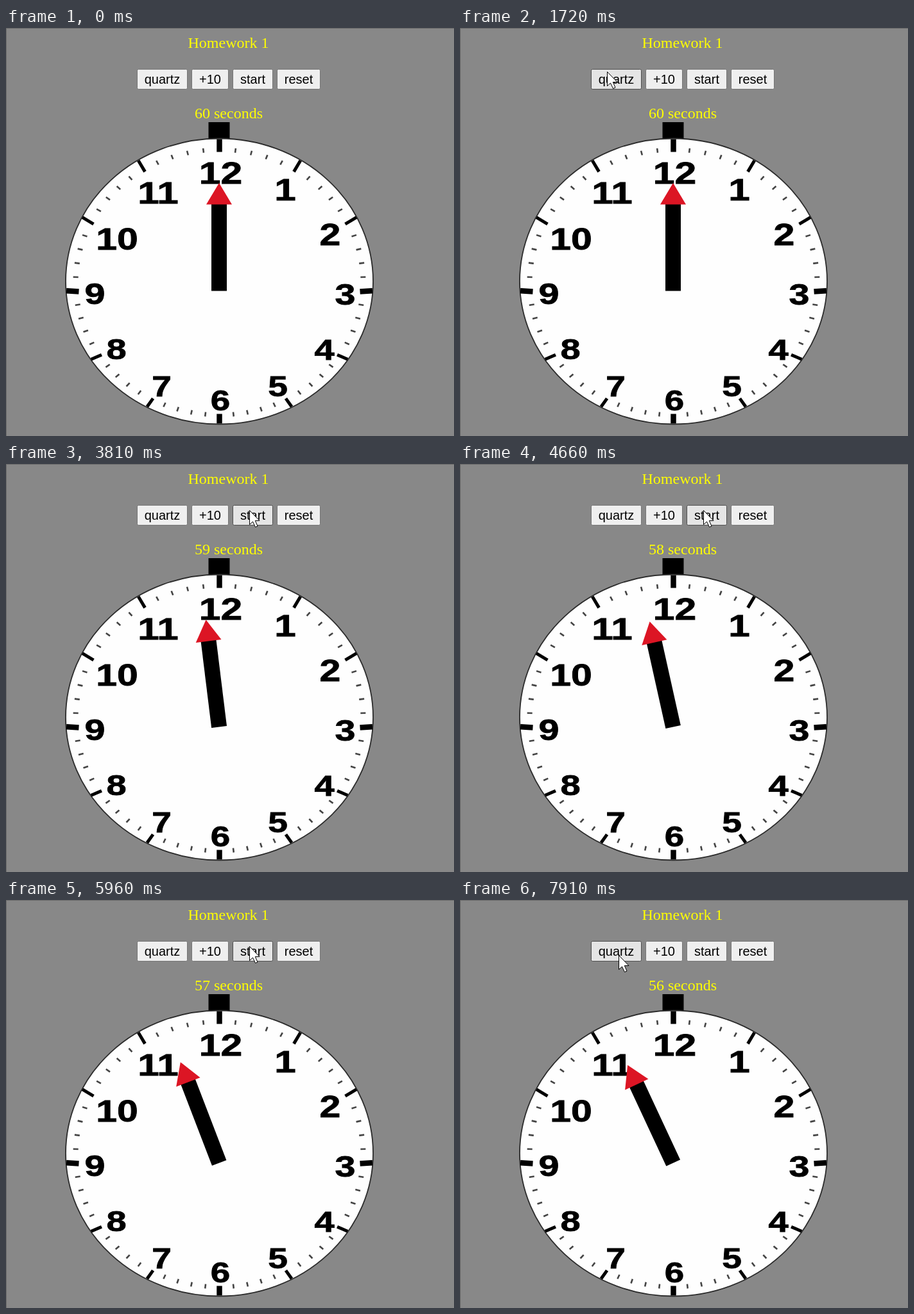
An HTML page that plays this animation: 698 by 637 pixels, repeating every 7.99 s.

```html
<!DOCTYPE html>
<html lang="en">
<head>
<meta charset="utf-8">
<title>Homework 1</title>
<style>
  html, body { margin: 0; width: 100%; height: 100%; overflow: hidden; background: #888; }
  svg { display: block; width: 698px; height: 637px; }
  text { text-anchor: middle; }
  .label { font: 24px "Liberation Serif", serif; fill: #ff0; }
  .button rect { fill: #efefef; stroke: #767676; }
  .button.hover rect { fill: #e5e5e5; stroke: #4f4f4f; }
  .button.active rect { fill: #f5f5f5; stroke: #8d8d8d; }
  .button text { font: 20px "Liberation Sans", sans-serif; }
  .numeral { font-family: "Liberation Sans", sans-serif; font-weight: bold; stroke: #000; stroke-width: .8; }
</style>
</head>
<body>
<svg id="stage" viewBox="0 0 698 637">
  <path d="M0 .5H698M.5 0V637" stroke="#6a6a6a"/>
  <text class="label" x="346.5" y="31">Homework 1</text>
  <g id="buttons"></g>
  <text class="label" id="seconds" x="347" y="141"></text>
  <path d="M315.5 147h33v27h-33z"/>
  <ellipse cx="332.5" cy="395.5" rx="239.5" ry="223" fill="#fefefe" stroke="#2c2c2c" stroke-width="1.8"/>
  <g id="dial"></g>
  <g id="hand">
    <path d="M320 274h24v136.5h-24z"/>
    <path d="M332 242l20 33.5h-40z" fill="#dc1524"/>
  </g>
  <circle id="click" cx="379" cy="72" r="18" fill="#d6d014" fill-opacity=".75"/>
  <path id="cursor" d="M.5 .5V22.5L5.5 18L9.5 26.5L13 25L9.3 16.5H16z" fill="#fff" stroke="#000"/>
</svg>
<script>
const LOOP = 7990;
const FRAME = 77.3;
const SPEED = 0.0065; // degrees per ms
const BUTTONS = [["quartz", 204, 79], ["+10", 289, 58], ["start", 353, 63], ["reset", 422, 68]];
const CLICKS = [[2650, 2730], [5890, 5960], [7220, 7290]];
// time, x, y of the pointer tip
const POINTER = [
  [200, 643, 516], [280, 632, 430], [360, 612, 322], [440, 597, 258], [520, 615, 276],
  [700, 585, 262], [780, 515, 222], [860, 425, 172], [940, 340, 122], [1020, 272, 88],
  [1100, 240, 74], [1180, 230, 69], [1720, 229, 68],
  [2190, 252, 76], [2270, 285, 80], [2340, 312, 78], [2490, 358, 74], [2570, 379, 72],
  [7370, 374, 74], [7450, 355, 79], [7530, 325, 85], [7600, 295, 89],
  [7680, 268, 90], [7760, 252, 88], [7830, 247, 86]
];
// centres of the numerals 1 to 12
const NUMERALS = [
  [435, 252], [505, 322], [528.5, 416], [496, 502], [423.5, 559], [334, 581],
  [242.5, 559], [172, 501], [138.5, 415], [173, 329], [237, 257], [334.5, 226]
];

const get = id => document.getElementById(id);
const clamp = (v, lo, hi) => Math.min(Math.max(v, lo), hi);

function add(parent, name, attrs, text = "") {
  const node = document.createElementNS("http://www.w3.org/2000/svg", name);
  for (const key in attrs) node.setAttribute(key, attrs[key]);
  node.textContent = text;
  return parent.appendChild(node);
}

function rim(minute, cy, rx, ry) {
  const turn = minute * Math.PI / 30;
  const angle = turn + 0.066 * Math.sin(turn);
  return `${332.5 + rx * Math.sin(angle)} ${cy - ry * Math.cos(angle)}`;
}

for (let m = 0; m < 60; m++) {
  const major = m % 5 === 0;
  const from = major ? rim(m, 395.5, 239, 222) : rim(m, 397, 228, 210.5);
  const to = major ? rim(m, 398, 219.5, 204.5) : rim(m, 397, 220, 203.5);
  add(get("dial"), "path", {
    d: `M${from}L${to}`,
    stroke: major ? "#000" : "#444",
    "stroke-width": m % 15 === 0 ? 8.5 : major ? 5 : 2.6
  });
}

NUMERALS.forEach(([x, y], i) => {
  const size = 52 - y * 0.0135;
  add(get("dial"), "text", {
    class: "numeral",
    "font-size": size,
    transform: `translate(${x} ${y + size * 0.352}) scale(1.24 1)`
  }, i + 1);
});

const buttons = BUTTONS.map(([label, x, width]) => {
  const node = add(get("buttons"), "g", { class: "button" });
  add(node, "rect", { x: x + 0.5, y: 64.5, width: width - 1, height: 31, rx: 2 });
  add(node, "text", { x: x + width / 2, y: 87 }, label);
  return { node, x, width };
});

function draw(t) {
  const tick = 2185 + FRAME * Math.floor((t - 2165) / FRAME);
  const running = clamp(tick, 2732, 5960) - 2732 + Math.max(tick - 7295, 0);
  const angle = SPEED * running;
  get("hand").setAttribute("transform", `rotate(${-angle} 332 410)`);
  get("seconds").textContent = `${Math.round(60 - angle / 6)} seconds`;

  const pressed = CLICKS.some(([down, up]) => t >= down && t < up);
  get("click").style.display = pressed ? "" : "none";

  const [, px, py] = POINTER.findLast(p => p[0] <= t) || [0, -50, -50];
  get("cursor").setAttribute("transform", `translate(${px} ${py})`);
  for (const { node, x, width } of buttons) {
    const over = px >= x && px < x + width && py >= 64 && py < 96;
    node.setAttribute("class", "button" + (over ? pressed ? " active" : " hover" : ""));
  }
}

const start = performance.now();
function loop() {
  draw((performance.now() - start) % LOOP);
  requestAnimationFrame(loop);
}
loop();
</script>
</body>
</html>
```
